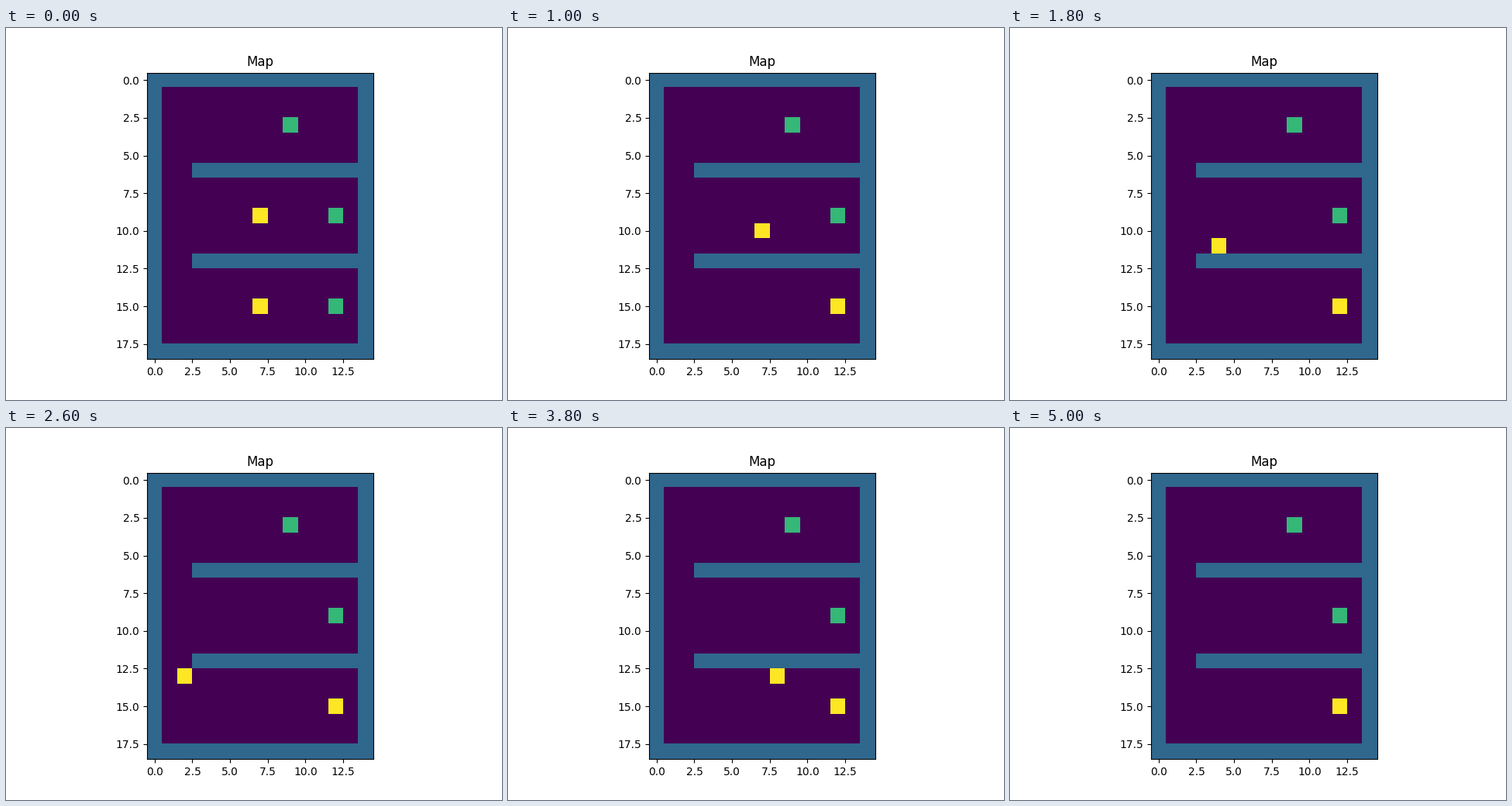
These frames come from a looping animation (640x480 px, 6000 ms). A matplotlib script:

```python
import numpy as np
import matplotlib.pyplot as plt
from matplotlib.animation import FuncAnimation

ROWS, COLS = 19, 15
FLOOR, WALL, GOAL, AGENT = range(4)
STEP_MS, FRAMES = 200, 30

GOALS = [(3, 9), (9, 12), (15, 12)]

# Corner points (row, col) of each agent's walk, one cell per step
UPPER_ROUTE = [(9, 7), (7, 7), (11, 7), (11, 2), (13, 2), (13, 12), (15, 12)]
LOWER_ROUTE = [(15, 7), (15, 12)]


def walk(corners):
    """Expand corner points into every cell visited."""
    cells = [corners[0]]
    for row, col in corners[1:]:
        while cells[-1] != (row, col):
            r, c = cells[-1]
            cells.append((r + int(np.sign(row - r)), c + int(np.sign(col - c))))
    return cells


def build_map():
    grid = np.full((ROWS, COLS), WALL)
    grid[1:-1, 1:-1] = FLOOR
    grid[[6, 12], 3:] = WALL
    for cell in GOALS:
        grid[cell] = GOAL
    return grid


BASE = build_map()
WALKS = [walk(UPPER_ROUTE), walk(LOWER_ROUTE)]


def grid_at(step):
    grid = BASE.copy()
    for cells in WALKS:
        grid[cells[min(step, len(cells) - 1)]] = AGENT
    return grid


fig, ax = plt.subplots(figsize=(6.4, 4.8), dpi=100)
ax.set_title("Map")
image = ax.imshow(grid_at(0), cmap="viridis", vmin=FLOOR, vmax=AGENT)


def update(step):
    image.set_data(grid_at(step))
    return [image]


anim = FuncAnimation(fig, update, frames=FRAMES, interval=STEP_MS,
                     repeat=True, repeat_delay=0)
plt.show()
```
